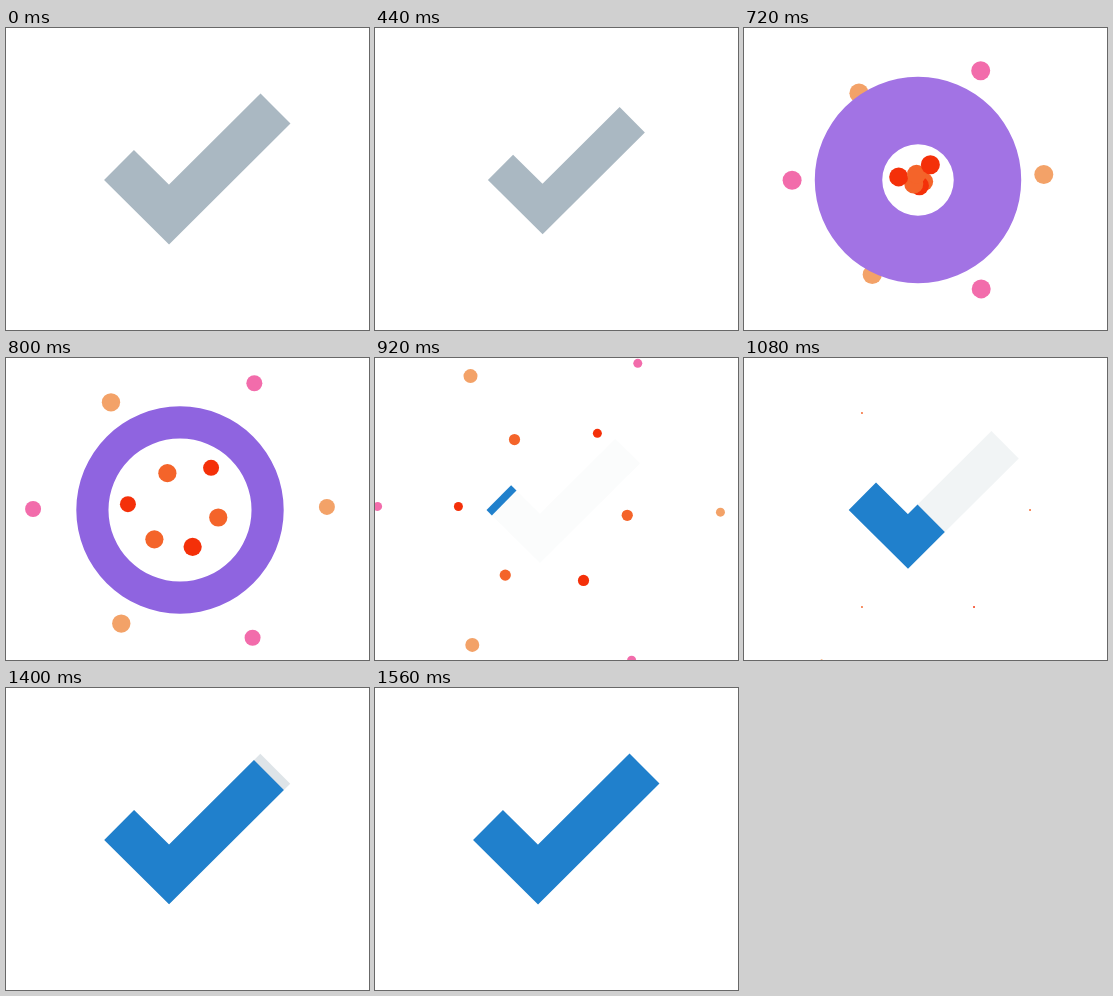
An HTML page with a canvas that plays this animation: 363 by 302 pixels, repeating every 2.44 s.

```html
<!DOCTYPE html>
<html lang="en">
<head>
<meta charset="utf-8">
<title>Check burst</title>
<style>
  html, body { margin: 0; width: 100%; height: 100%; overflow: hidden; background: #fff; }
  canvas { display: block; }
</style>
</head>
<body>
<canvas id="stage" width="363" height="302"></canvas>
<script>
const ctx = document.getElementById('stage').getContext('2d');
const LOOP = 2440, STEP = 40;
const CX = 174, CY = 152;
const CHECK_LENGTH = 220.7;
const GREY = '#aab8c2', BLUE = '#2080cc';

const clamp = x => Math.min(1, Math.max(0, x));
const progress = (t, from, to) => clamp((t - from) / (to - from));
const easeOut = (p, power = 2) => 1 - (1 - p) ** power;
const mix = (a, b, p) => a + (b - a) * p;

function drawCheck(color, scale, originX, drawn = 1, alpha = 1) {
  if (scale <= 0 || drawn <= 0 || alpha <= 0) return;
  ctx.save();
  ctx.translate(originX, CY);
  ctx.scale(scale, scale);
  ctx.translate(-originX, -CY);
  ctx.globalAlpha = alpha;
  ctx.strokeStyle = color;
  ctx.lineWidth = 42.5;
  if (drawn < 1) ctx.setLineDash([CHECK_LENGTH * drawn, CHECK_LENGTH * 2]);
  ctx.beginPath();
  ctx.moveTo(113, 137);
  ctx.lineTo(163, 186.5);
  ctx.lineTo(269.5, 80.5);
  ctx.stroke();
  ctx.restore();
}

function drawDot(angle, distance, radius, color) {
  if (radius <= 0) return;
  const a = angle * Math.PI / 180;
  ctx.fillStyle = color;
  ctx.beginPath();
  ctx.arc(CX + distance * Math.cos(a), CY + distance * Math.sin(a), radius, 0, 7);
  ctx.fill();
}

const travel = t => easeOut(progress(t, 680, 1210));
const shrink = t => Math.min(9.5, 11.5 * (1 - (t - 680) / 394));

function drawBurst(t) {
  if (t < 680 || t > 1160) return;
  for (let i = 0; i < 6; i++) {
    const angle = i * 60;

    const lateOuter = i === 2 || i === 4;
    if (lateOuter) {
      const size = 9.6 * (1 - (Math.max(0, t - 720) / 384) ** 2);
      drawDot(angle + (t - 940) * 0.019, mix(105, 187, travel(t - 40)), size, '#f3a268');
    } else {
      const spin = i ? (t - 740) * 0.0066 : (t - 875) * 0.016;
      drawDot(angle + spin, mix(114, 196, travel(t)), shrink(t), i % 2 ? '#f26cab' : '#f3a268');
    }

    const early = i === 3 || i === 5;
    const spin = Math.max(0, 985 - t) * (early ? 0.0345 : 0.06);
    const local = early ? t : t - 38;
    const distance = early ? mix(1, 129, travel(local)) : mix(5, 124, travel(local));
    drawDot(angle + spin, distance, shrink(local), i % 2 ? '#f43009' : '#f4642a');
  }
}

// A disc that opens into a thinning ring
function drawRing(t) {
  const outer = 103.7 * easeOut(progress(t, 480, 768), 3);
  const hole = Math.max(0, (t - 640) * 0.447);
  if (outer <= hole) return;
  const p = (t - 600) / 200;
  const rgb = [mix(191, 143, p), mix(138, 100, p), mix(235, 224, p)].map(Math.round);
  ctx.fillStyle = `rgb(${rgb})`;
  ctx.beginPath();
  ctx.arc(CX, CY, outer, 0, 2 * Math.PI);
  ctx.arc(CX, CY, hole, 0, 2 * Math.PI, true);
  ctx.fill();
}

function draw(t) {
  ctx.fillStyle = '#fff';
  ctx.fillRect(0, 0, 363, 302);

  drawCheck(GREY, 1 - progress(t, 400, 653), 192);
  drawBurst(t);
  drawRing(t);

  if (t >= 880) {
    const scale = 1 - 0.177 * (Math.max(0, 1463 - t) / 543) ** 2;
    const drawn = easeOut(progress(t, 907, 1525));
    if (drawn < 1) drawCheck(GREY, scale, CX, 1, (t - 850) * 0.0007);
    drawCheck(BLUE, scale, CX, drawn);
  }
}

const start = performance.now();
function frame() {
  const t = (performance.now() - start) % LOOP;
  draw(t < 440 ? 0 : Math.floor(t / STEP) * STEP);
  requestAnimationFrame(frame);
}
frame();
</script>
</body>
</html>
```
